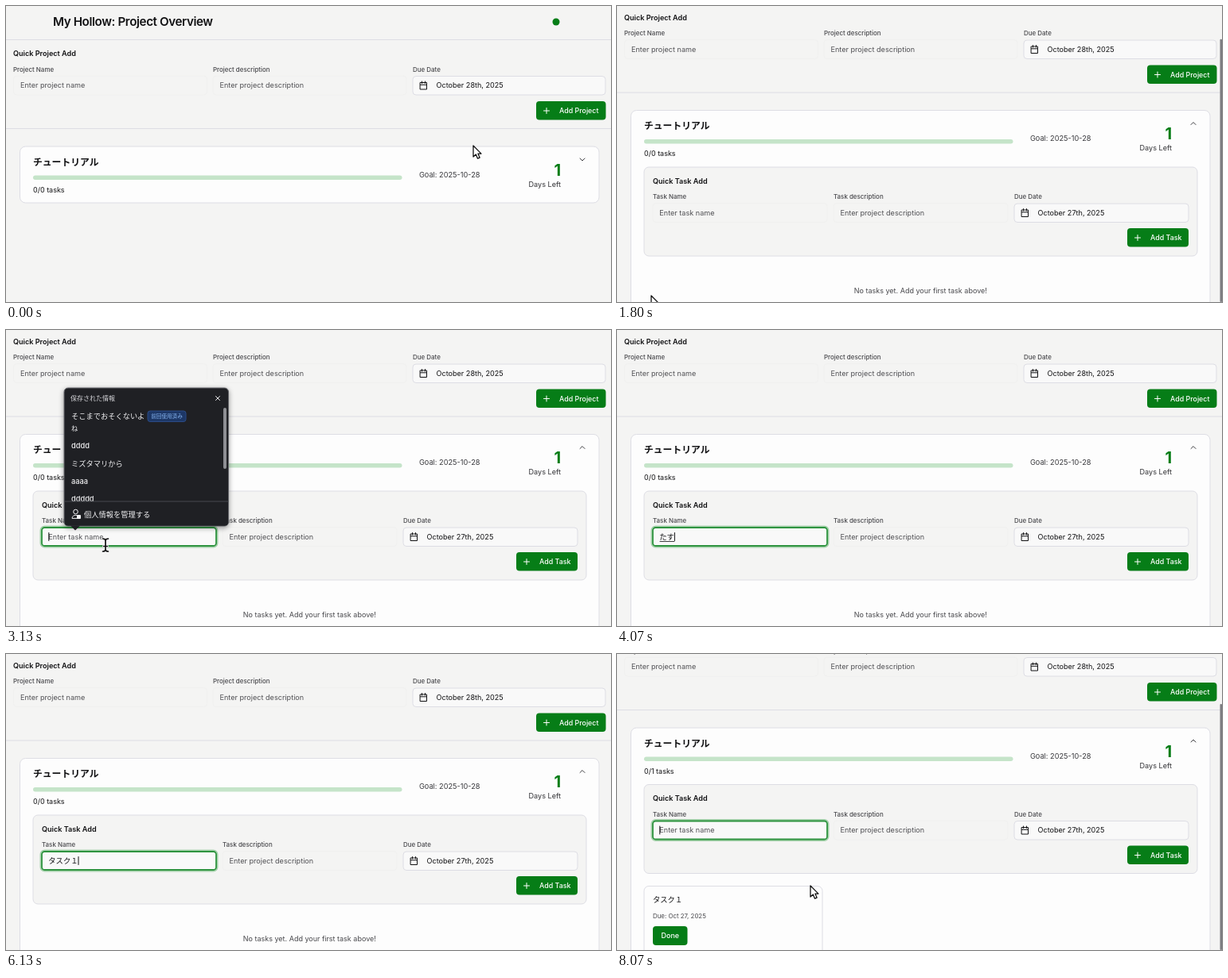
An HTML page that plays this animation: 760x373 px, repeating every 8.14 s.

```html
<!DOCTYPE html>
<html lang="en">
<head>
<meta charset="utf-8">
<title>Project overview</title>
<style>
html, body { margin: 0; width: 100%; height: 100%; overflow: hidden; background: #f4f4f3; }
svg { display: block; width: 760px; height: 373px; font-family: Inter, "Noto Sans CJK JP", "Noto Sans CJK", sans-serif; }
</style>
</head>
<body>
<svg id="stage" viewBox="0 0 760 373"></svg>
<script>
const LOOP = 8140;
const BG = '#f4f4f3', CARD = '#fdfdfd', LINE = '#dddde4', GREEN = '#067d17';
const INK = '#121214', GREY = '#48484c', HINT = '#505054';
const DARK = '#1f2024', PALE = '#f0f0f2';

// Text is placed by its left edge and the middle of its capitals.
const text = (x, mid, str, size = 9.1, fill = INK, weight = 400, more = '') =>
  `<text x="${x}" y="${mid + size * .36}" font-size="${size}" fill="${fill}" font-weight="${weight}" ${more}>${str}</text>`;
const rect = (x, y, w, h, r, fill, stroke = 'none', more = '') =>
  `<rect x="${x}" y="${y}" width="${w}" height="${h}" rx="${r}" fill="${fill}" stroke="${stroke}" ${more}/>`;
const path = (d, stroke = INK, width = 1, more = '') =>
  `<path d="${d}" fill="none" stroke="${stroke}" stroke-width="${width}" stroke-linecap="round" stroke-linejoin="round" ${more}/>`;
const group = (id, body) => `<g id="${id}">${body}</g>`;

const label = (x, y, str) => text(x, y, str, 7.95, GREY, 500);
const field = (x, y, w, hint) => rect(x, y, w, 24, 4, BG, '#f0f0ef') + text(x + 8.5, y + 12, hint, 9.1, HINT);

function dateField(x, y, w, date) {
  const icon = path(`M${x + 9.5} ${y + 8.5}h8v8.5h-8zm0 2.8h8m-6-4.3v2.5m4 -2.5v2.5`);
  return rect(x, y + .5, w, 23.5, 4, '#f9f9f9', LINE) + icon + text(x + 29.5, y + 12, date);
}

function button(x, y, w, str) {
  const plus = path(`M${x + 9.5} ${y + 12}h7m-3.5-3.5v7`, '#fff');
  return rect(x, y, w, 23.5, 4, GREEN) + plus + text(x + 29, y + 12, str, 8.9, '#fff', 500);
}

const header =
  text(59, 20, 'My Hollow: Project Overview', 15.2, INK, 600, 'letter-spacing="-.4"') +
  `<circle cx="691" cy="20" r="4.5" fill="${GREEN}"/>` + path('M0 42.5H760', LINE);

const projectForm =
  text(9, 60, 'Quick Project Add', 9.1, INK, 600) +
  label(9, 80, 'Project Name') + label(260, 80, 'Project description') + label(511, 80, 'Due Date') +
  field(9.5, 88, 243, 'Enter project name') + field(260, 88, 243, 'Enter project description') +
  dateField(511, 88, 242, 'October 28th, 2025') + button(666, 120, 87.5, 'Add Project') +
  path('M0 154.5H760', LINE);

const summary =
  text(34, 196.5, 'チュートリアル', 11.8, INK, 700) +
  rect(34, 213.5, 463.5, 5.5, 2.75, '#c5e4c9') +
  text(34, 231.4, '', 9, INK, 400, 'id="count"') +
  text(519, 212.5, 'Goal: 2025-10-28', 9.2, '#38383c') +
  text(697, 206.5, '1', 20, GREEN, 700, 'text-anchor="end"') +
  text(697, 224.5, 'Days Left', 9.1, '#303034', 400, 'text-anchor="end"') +
  path('', '#404044', 1, 'id="chevron"');

const taskForm =
  rect(34, 248.5, 695, 112, 6, BG, LINE) +
  text(45, 266, 'Quick Task Add', 9.1, INK, 600) +
  label(45, 286, 'Task Name') + label(272, 286, 'Task description') + label(499, 286, 'Due Date') +
  field(45, 294, 219, '') + field(272, 294, 219, 'Enter project description') +
  dateField(499, 294, 219, 'October 27th, 2025') + button(641, 325.5, 77, 'Add Task') +
  group('focus', rect(44.5, 294, 220, 24, 4, CARD, '#a6d2ac', 'stroke-width="4"') +
    rect(45, 294.5, 219, 23, 3.5, '#f9f9f9', '#2f9440', 'stroke-width="1.8"')) +
  text(53.3, 306, 'Enter task name', 9.1, HINT, 400, 'id="hint"') +
  text(53.3, 306, '', 9.3, INK, 400, 'id="typed"') +
  path('', INK, .8, 'id="underline"') + path('', INK, 1, 'id="caret"');

const task =
  rect(34, 376.5, 224, 90, 6, CARD, LINE) + text(45, 394, 'タスク１', 9.3) +
  text(45, 414, 'Due: Oct 27, 2025', 7.9, GREY) +
  rect(45, 427, 43.5, 24, 4, GREEN) + text(55.5, 439, 'Done', 9, '#fff', 500);

// Suggestion box; its bottom always rests on the task name field.
function popup(id, top, thumb, body) {
  return group(id,
    rect(73, top, 206.5, 247 - top, 5, DARK, '#66676c', 'filter="drop-shadow(0 2px 3px #0006)"') +
    `<path d="M81 246.5h12l-6 6z" fill="${DARK}"/>` +
    text(81, top + 13, '保存された情報', 8, '#d8d8dc') +
    path(`M263.5 ${top + 10.5}l5 5m0-5l-5 5`, PALE) +
    rect(273, top + 25, 4, thumb, 2, '#8e8f94') + body);
}
const choice = (y, str, x = 82) => text(x, y, str, 9.25, PALE, 500);

const saved =
  choice(109, 'そこまでおそくないよ') + text(82, 124, 'ね', 8.2, PALE) +
  rect(178, 102, 48, 13.5, 3, '#1d3766', '#2b4b85') +
  text(202, 108.7, '前回使用済み', 6.6, '#86b4f0', 400, 'text-anchor="middle"') +
  ['dddd', 'ミズタマリから', 'aaaa', 'ddddd'].map((s, i) => choice(146 + i * 22.3, s)).join('') +
  rect(74, 216, 205, 30.5, 4, DARK) + path('M74 216H279', '#47484f') +
  `<circle cx="87.5" cy="229" r="2.8" fill="none" stroke="${PALE}"/>` +
  path('M83 237c0-5 9-5 9 0z', PALE) + rect(89, 233, 5, 5, 1, PALE) +
  choice(232.5, '個人情報を管理する', 98);

const matches = ['の登録', '登録', 'うう', '', 'ですう', 'の追加']
  .map((s, i) => choice(122.5 + i * 22.4, 'タスク' + s)).join('');

const beam = 'M-3.5-8q3.5 0 3.5 2.5v11q0 2.5-3.5 2.5m7-16q-3.5 0-3.5 2.5m0 11q0 2.5 3.5 2.5m-6-6.5h5';

const stage = document.getElementById('stage');
stage.innerHTML = rect(0, 0, 760, 373, 0, BG) +
  group('page', header + projectForm +
    rect(17.5, 177, 727.5, 71, 7, CARD, LINE, 'id="card"') + summary +
    group('open', taskForm +
      group('empty', text(381.3, 404, 'No tasks yet. Add your first task above!', 9, GREY, 400, 'text-anchor="middle"')) +
      group('task', task))) +
  rect(757.5, 0, 2.5, 0, 1, '#7c7c80', 'none', 'id="bar"') +
  popup('saved', 73, 77, saved) + popup('matches', 88, 126, matches) +
  group('arrow', '<path d="M0 0v14l3.3-3 2.2 5.2 2.6-1.1-2.2-5H10z" fill="#fff" stroke="#111" stroke-width="1.3" stroke-linejoin="round"/>') +
  group('beam', path(beam, '#fff', 3.2) + path(beam, '#111', 1.7));

const $ = id => document.getElementById(id);
const show = (id, on) => $(id).style.display = on ? '' : 'none';
const move = (id, x, y) => $(id).setAttribute('transform', `translate(${x} ${y})`);

const OPEN = 670, FOCUS = 2800, ENTER = 6600;
// time, x, y of the mouse; it rests wherever a place is repeated
const mouse = [[0, 587, 176], [0, 587, 176], [470, 722, 192], [1030, 722, 192], [1270, 538, 223],
  [1620, 43, 365], [2000, 43, 365], [2600, 125, 271], [7000, 125, 271], [7470, 243, 292], [LOOP, 243, 292]];
// time, field content, still being composed
const keys = [[FOCUS, '', 0], [3670, 'ｔ', 1], [3800, 'た', 1], [3930, 'たｓ', 1], [4070, 'たす', 1],
  [4200, 'たすｋ', 1], [4330, 'たすく', 1], [4600, 'タスク', 1], [4930, 'タスク', 0],
  [5400, 'タスク１', 1], [5730, 'タスク１', 0], [ENTER, '', 0]];

const clamp = v => Math.max(0, Math.min(1, v));
const easeOut = v => 1 - (1 - v) ** 3;

// Speed along one axis at a mouse point, zero next to a rest.
function speed(i, axis) {
  const [a, b, c] = [mouse[i - 1], mouse[i], mouse[i + 1]];
  if (!a || !c || a[1] === b[1] || b[1] === c[1]) return 0;
  return (c[axis] - a[axis]) / (c[0] - a[0]);
}

function mouseAt(t) {
  const i = mouse.findIndex(m => m[0] > t), [a, b] = [mouse[i - 1], mouse[i]];
  const span = b[0] - a[0], p = (t - a[0]) / span, q = 1 - p;
  return [1, 2].map(k =>
    a[k] * q * q * (1 + 2 * p) + b[k] * p * p * (1 + 2 * q) +
    span * p * q * (q * speed(i - 1, k) - p * speed(i, k)));
}

function draw(t) {
  const open = t >= OPEN, added = t >= ENTER, focused = t >= FOCUS;
  const scroll = 45.5 * easeOut(clamp((t - 1450) / 380)) + 38.5 * easeOut(clamp((t - 7550) / 500));
  move('page', 0, -scroll);
  show('open', open);
  show('empty', !added);
  show('task', added);
  show('focus', focused);
  $('card').setAttribute('height', open ? 500 : 71);
  $('chevron').setAttribute('d', open ? 'M721 195l3-3 3 3' : 'M721 192l3 3 3-3');
  $('count').textContent = added ? '0/1 tasks' : '0/0 tasks';

  const [since, str, composing] = keys.filter(k => k[0] <= t).pop() || [0, '', 0];
  $('typed').textContent = str;
  show('hint', !str);
  const end = 53.8 + (str ? $('typed').getComputedTextLength() : 0);
  $('caret').setAttribute('d', `M${end} 301v10`);
  show('caret', focused && (t - since) % 1060 < 530);
  $('underline').setAttribute('d', `M54 312H${end - .5}`);
  show('underline', composing);

  show('saved', t >= 2870 && t < 3670);
  show('matches', t >= 4600 && t < 5400);

  const top = scroll * (added ? .75 : .92);
  $('bar').setAttribute('y', top);
  $('bar').setAttribute('height', 373 - top);
  $('bar').style.opacity = t > 7550 ? 1 : t > 1450 ? clamp((2550 - t) / 250) : 0;

  const [x, y] = mouseAt(t);
  const over = open && x > 45 && x < 264 && y > 294 - scroll && y < 318 - scroll;
  const hidden = t >= 3670 && t < 7000;
  show('arrow', !over && !hidden);
  show('beam', over && !hidden);
  move('arrow', x, y);
  move('beam', x, y);
}

const start = performance.now();
function tick() {
  draw((performance.now() - start) % LOOP);
  requestAnimationFrame(tick);
}
tick();
</script>
</body>
</html>
```
